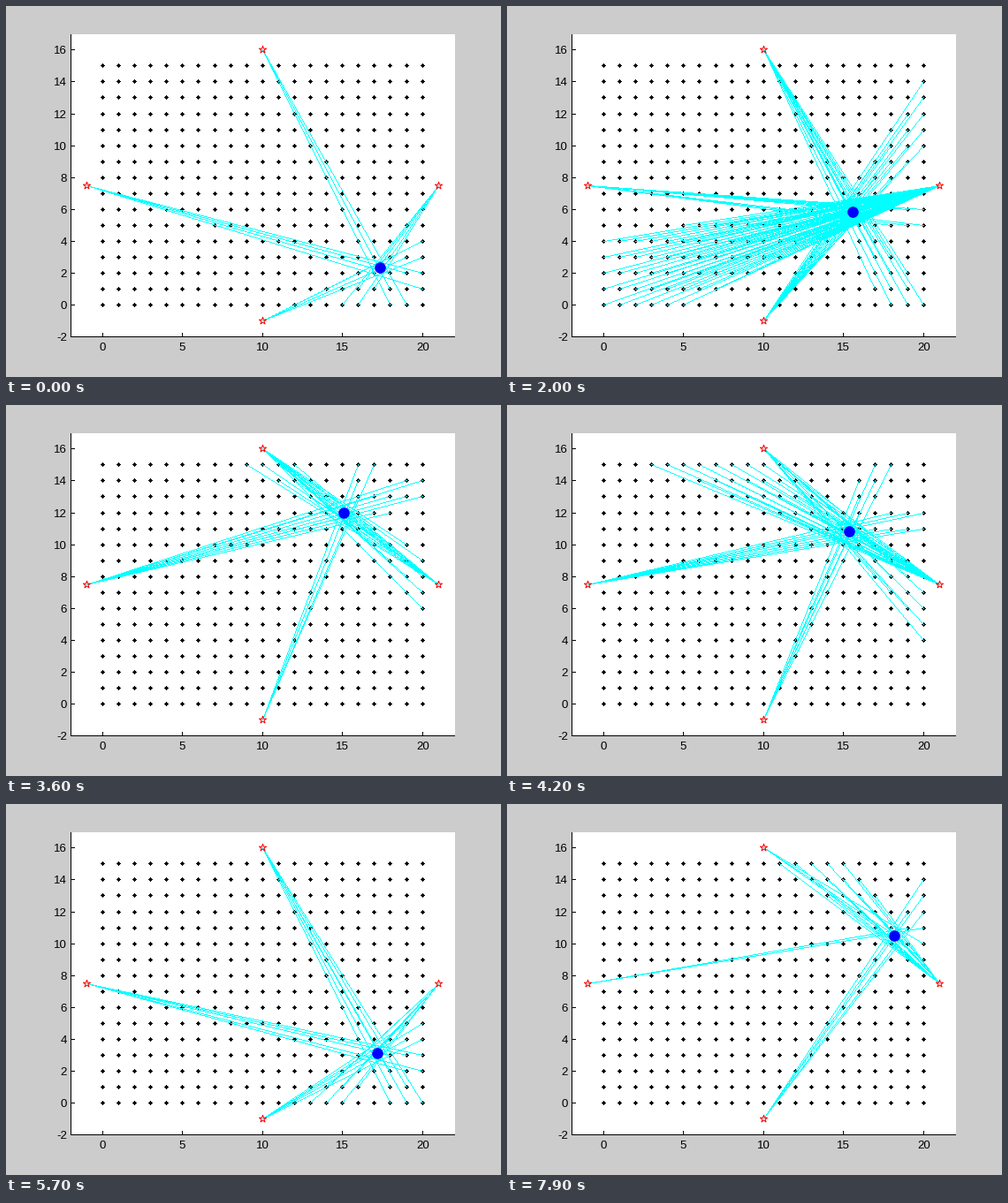
A matplotlib script for the animation above (8000 ms loop, 560 by 420 pixels).

```python
import numpy as np
import matplotlib.pyplot as plt
from matplotlib.animation import FuncAnimation
from matplotlib.collections import PolyCollection

W, H, DPI = 560, 420, 80
FRAMES, STEP = 80, 100
PX = 72 / DPI        # points per pixel
SLACK = 0.1          # extra path length that still blocks a link
CYAN = (0, 255, 255, 255)

plt.rcParams["font.family"] = "Liberation Sans"

# The walker swings up and down the room while drifting sideways.
KEY_T = [0, 2, 3, 4.2, 5.7, 7, 7.9]
DRIFT = np.polyfit(KEY_T, [17.37, 15.6, 15.1, 15.375, 17.2, 18.8, 18.195], 6)
SWING = np.polyfit(KEY_T, [-3.498, -1.811, -0.738, 0.704, 2.468, 4.427, 5.481], 6)

SENSORS = np.array([(-1, 7.5), (10, 16), (21, 7.5), (10, -1)])
GRID = np.array([(x, y) for x in range(21) for y in range(16)], float)


def pixel(p):
    """Data units to column and row on the stage."""
    p = np.asarray(p, float)
    cols = 108.97 + 18.083 * p[..., 0]
    rows = 337.7 - 18.016 * p[..., 1]
    return np.rint(np.stack([cols, rows], axis=-1)).astype(int)


def walker(t):
    return np.array([np.polyval(DRIFT, t), 7 + 5 * np.cos(np.polyval(SWING, t))])


def dist(a, b):
    return np.linalg.norm(a - b, axis=-1)


def beam_layer(pos):
    """Crisp one-pixel links whose narrow ellipse contains the walker."""
    layer = np.zeros((H, W, 4), np.uint8)
    for sensor in SENSORS:
        detour = dist(sensor, pos) + dist(GRID, pos) - dist(GRID, sensor)
        start = pixel(sensor)
        for end in pixel(GRID[detour < SLACK]):
            count = np.abs(end - start).max() + 1
            cols, rows = np.rint(np.linspace(start, end, count)).astype(int).T
            layer[rows, cols] = CYAN
    return layer


def polygon(radii, n):
    """Corners around the origin, first one on top."""
    a = 2 * np.pi * np.arange(n) / n
    r = np.resize(radii, n)
    return np.stack([r * np.sin(a), -r * np.cos(a)], axis=-1)


def stamp(shape, points, **style):
    """The same shape centred on the pixel of every point."""
    verts = pixel(points)[:, None] + 0.5 + shape
    ax.add_collection(PolyCollection(verts, snap=False, **style), autolim=False)


def box(x, y, w, h, color="black"):
    ax.add_patch(plt.Rectangle((x, y), w, h, fc=color, lw=0, zorder=1))


def label(x, y, value, ha):
    ax.text(x, y, str(value), fontsize=13.3 * PX, ha=ha,
            va="center_baseline", color="black")


fig = plt.figure(figsize=(W / DPI, H / DPI), dpi=DPI, facecolor="#cccccc")
ax = fig.add_axes([0, 0, 1, 1])
ax.axis("off")
beams = ax.imshow(np.zeros((H, W, 4), np.uint8), extent=(0, W, H, 0),
                  interpolation="none", aspect="auto", zorder=3)
ax.set_xlim(0, W)
ax.set_ylim(H, 0)

LEFT, TOP, RIGHT, BOTTOM = 73, 32, 508, 374
box(LEFT, TOP, RIGHT - LEFT, BOTTOM - TOP, "white")
box(LEFT, TOP, 1, BOTTOM - TOP + 1)
box(LEFT, BOTTOM, RIGHT - LEFT, 1)
for v in range(0, 21, 5):
    col = pixel((v, 0))[0]
    box(col, BOTTOM - 4, 1, 4)
    label(col + 0.5, 385.5, v, "center")
for v in range(-2, 17, 2):
    row = pixel((0, v))[1]
    box(LEFT, row, 5, 1)
    label(69, row + 0.5, v, "right")

stamp(polygon([1.9], 4), GRID, fc="black", lw=0, antialiased=False, zorder=2)
stamp(polygon([4.3, 1.65], 10), SENSORS, fc="none", ec="red", lw=PX, zorder=4)
body = ax.add_patch(plt.Circle((0, 0), 6.3, fc="blue", lw=0, zorder=5))


def draw(n):
    pos = walker(n * STEP / 1000)
    beams.set_data(beam_layer(pos))
    body.center = tuple(pixel(pos) + 0.5)
    return beams, body


anim = FuncAnimation(fig, draw, frames=FRAMES, interval=STEP,
                     repeat=True, repeat_delay=0)
plt.show()
```
